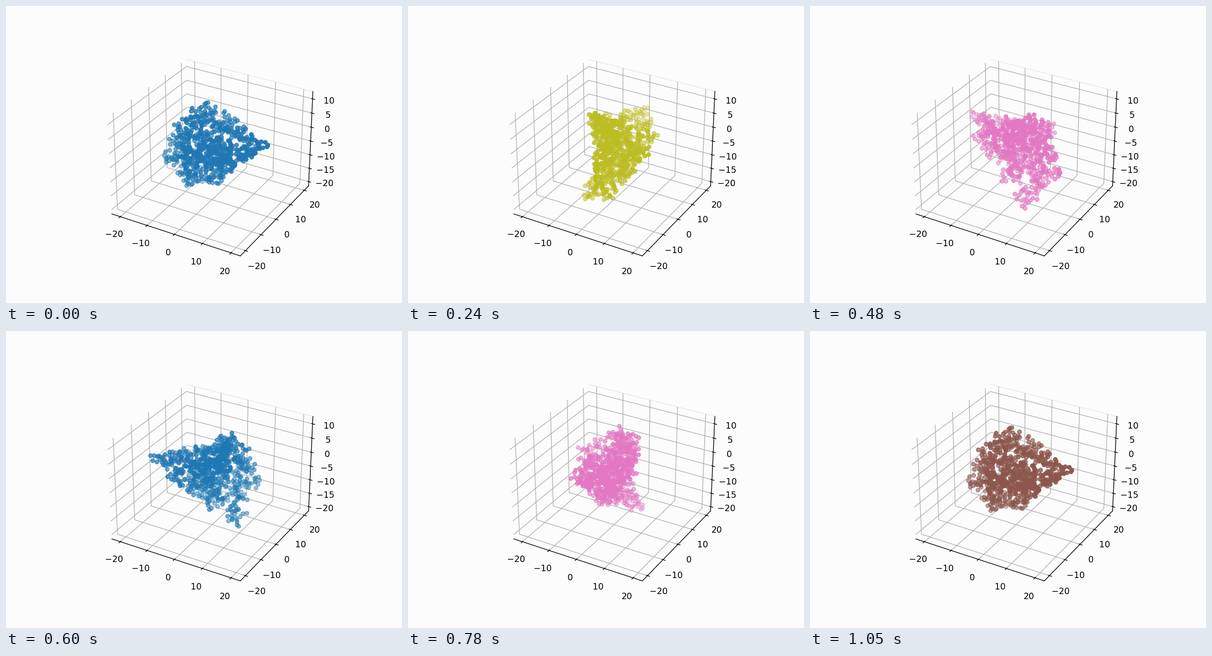
Animation, 864 px wide and 648 px high, one loop 1080 ms. Source, as a matplotlib script:

```python
import matplotlib.pyplot as plt
import numpy as np
from matplotlib.animation import FuncAnimation

FRAMES = 36
INTERVAL = 30
PARTICLES = 650
STEP = 1.4
RADIUS = 22.27
Z_RANGE = (-20.9, 11.9)
BACKGROUND = "#fcfcfc"

# Outermost points of the aggregate
TIPS = np.array([
    (-9, 6, -20.5), (-7, -5, -17), (20, 1, 3), (-16, -5, -9),
    (-4, 7, 10.5), (-6, -2, 11), (13, -8, -1), (4, -3, -14),
    (-2, -15, 1), (13, 7, -2), (-12, -4, 4), (2, 10, 5),
])


def grow_cluster(rng):
    """Random tree: the cell nearest to a drifting point buds towards it."""
    cells = np.zeros((1, 3))
    while len(cells) < PARTICLES:
        corners = rng.choice(TIPS, 4, replace=False)
        drifter = rng.dirichlet([0.5] * 4) @ corners
        gaps = np.linalg.norm(cells - drifter, axis=1)
        near = gaps.argmin()
        if gaps[near] >= STEP:
            bud = cells[near] + (drifter - cells[near]) * STEP / gaps[near]
            cells = np.vstack([cells, bud])
    return cells.T


def style_axes(ax):
    ax.set_facecolor(BACKGROUND)
    for axis in (ax.xaxis, ax.yaxis, ax.zaxis):
        axis.set_pane_color(BACKGROUND)
    ax.yaxis.pane.set_edgecolor("#ececec")
    ax.set_xlim(-RADIUS, RADIUS, view_margin=1 / 48)
    ax.set_ylim(-RADIUS, RADIUS, view_margin=1 / 48)
    ax.set_zlim(*Z_RANGE, view_margin=1 / 48)
    ax.set_xticks(range(-20, 21, 10))
    ax.set_yticks(range(-20, 21, 10))
    ax.set_zticks(range(-20, 11, 5))


fig = plt.figure(figsize=(6.4, 4.8), dpi=135, facecolor=BACKGROUND)
ax = fig.add_subplot(projection="3d")
style_axes(ax)
x, y, z = grow_cluster(np.random.default_rng(7))


def update(i):
    for old in list(ax.collections):
        old.remove()
    turn = 2 * np.pi * i / (FRAMES - 1)
    c, s = np.cos(turn), np.sin(turn)
    dots = ax.scatter(c * x - s * y, s * x + c * y, z, color=f"C{i % 10}")
    return [dots]


anim = FuncAnimation(fig, update, frames=FRAMES, interval=INTERVAL,
                     repeat=True, repeat_delay=0, blit=False)
plt.show()
```
